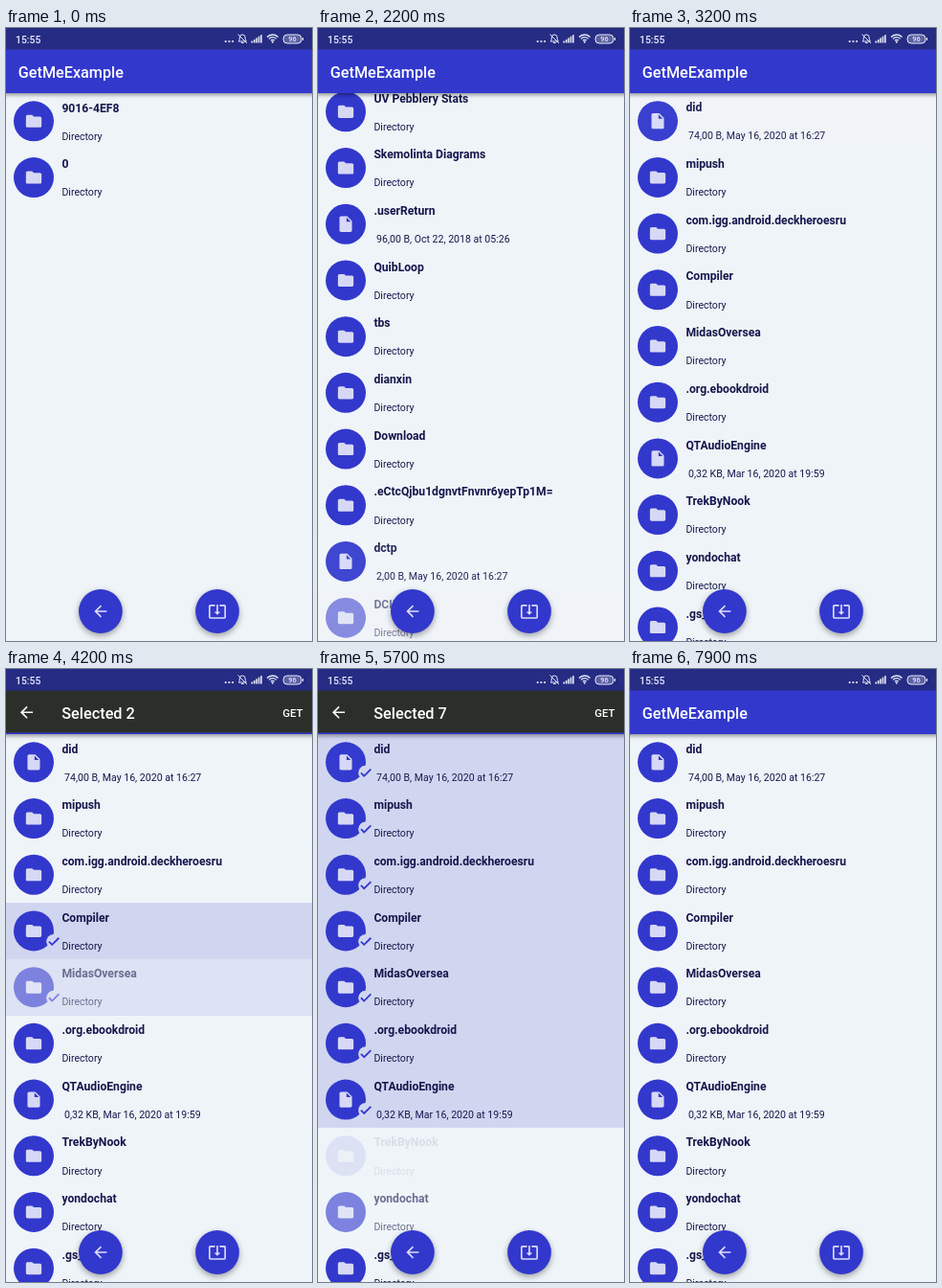
Write an HTML page with a canvas that moves like this. It is 320x640 px and loops after 8000 ms.

```html
<!DOCTYPE html>
<html lang="en">
<head>
<meta charset="utf-8">
<title>File picker</title>
<style>
  html, body { margin: 0; width: 100%; height: 100%; overflow: hidden; background: #eff4f9; }
  canvas { display: block; width: 320px; height: 640px; }
</style>
</head>
<body>
<canvas id="stage"></canvas>
<script>
const W = 320, H = 640, LOOP = 8000;
const TOP = 68, ROW = 58.7, DP = 0.815;
const FADE = 300, OPEN = 1250;
const BLUE = '#3238cc', NAVY = '#262c84', BG = '#eff4f9', PICKED = '#d0d5f0';
const INK = '#15174b', PALE = '#d6d8f6', DARK = '#2b2f2a';

const canvas = document.getElementById('stage');
const dpr = window.devicePixelRatio || 1;
canvas.width = W * dpr;
canvas.height = H * dpr;
const ctx = canvas.getContext('2d');

const icons = {
  folder: 'M10 4H4c-1.1 0-1.99.9-1.99 2L2 18c0 1.1.9 2 2 2h16c1.1 0 2-.9 2-2V8c0-1.1-.9-2-2-2h-8l-2-2z',
  file: 'M6 2c-1.1 0-1.99.9-1.99 2L4 20c0 1.1.89 2 1.99 2H18c1.1 0 2-.9 2-2V8l-6-6H6zm7 7V3.5L18.5 9H13z',
  back: 'M20 11H7.83l5.59-5.59L12 4l-8 8 8 8 1.41-1.41L7.83 13H20v-2z',
  save: 'M12 16.5l4-4h-3v-9h-2v9H8l4 4zm9-13h-6v1.99h6v14.03H3V5.49h6V3.5H3c-1.1 0-2 .9-2 2v14c0 1.1.9 2 2 2h18c1.1 0 2-.9 2-2v-14c0-1.1-.9-2-2-2z'
};
for (const k in icons) icons[k] = new Path2D(icons[k]);

// Entries with a part after "|" are files, the rest are directories.
const parse = s => {
  const [name, info] = s.split('|');
  return { name, info: info || 'Directory', icon: info ? 'file' : 'folder' };
};
const roots = ['9016-4EF8', '0'].map(parse);
const files = [
  'did| 74,00 B, May 16, 2020 at 16:27', 'mipush', 'com.igg.android.deckheroesru',
  'Compiler', 'MidasOversea', '.org.ebookdroid',
  'QTAudioEngine| 0,32 KB, Mar 16, 2020 at 19:59', 'TrekByNook', 'yondochat',
  '.gs_fs0', 'Android', 'Pictures', 'Movies', 'Alarms',
  'UV Pebblery Stats', 'Skemolinta Diagrams',
  '.userReturn| 96,00 B, Oct 22, 2018 at 05:26', 'QuibLoop', 'tbs', 'dianxin',
  'Download', '.eCtcQjbu1dgnvtFnvnr6yepTp1M=',
  'dctp| 2,00 B, May 16, 2020 at 16:27', 'DCIM', 'Music', 'Podcasts', 'Ringtones'
].map(parse);

// [time, row]: each tap toggles a row.
const taps = [
  [3800, 3], [4030, 4], [4260, 5], [4490, 6], [4720, 7], [4950, 8],
  [5200, 2], [5310, 1], [5420, 0], [5530, 8], [5640, 7], [5750, 6],
  [5860, 5], [5970, 4], [6220, 0], [6340, 1], [6560, 2], [6780, 3]
];

const clamp = v => Math.max(0, Math.min(1, v));
const fling = (t, a, b) => 1 - (1 - clamp((t - a) / (b - a))) ** 3;
const scrollAt = t =>
  844.8 * (fling(t, 1540, 2420) - fling(t, 2520, 3240)) +
  3.2 * (fling(t, 4550, 4750) - fling(t, 5120, 5300));

const inView = (i, t) => {
  const y = i * ROW - scrollAt(t);
  return y < H - TOP && y + ROW > 0;
};

// Opacity since the row was last opened, scrolled in or tapped.
function rowAlpha(i, t) {
  let age = Math.min(FADE, t - OPEN);
  for (const [at, row] of taps) if (row === i && at <= t) age = Math.min(age, t - at);
  for (let d = 0; d < age; d += 8) if (!inView(i, t - d)) age = d;
  return (1 - Math.cos(Math.PI * clamp(age / FADE))) / 2;
}

function text(s, x, y, size, weight, color, align = 'left') {
  ctx.font = `${weight} ${size}px Roboto, sans-serif`;
  ctx.textAlign = align;
  ctx.fillStyle = color;
  ctx.fillText(s, x, y);
}

function disc(x, y, r, color) {
  ctx.fillStyle = color;
  ctx.beginPath();
  ctx.arc(x, y, r, 0, Math.PI * 2);
  ctx.fill();
}

function icon(name, x, y, color) {
  ctx.save();
  ctx.translate(x - 12 * DP, y - 12 * DP);
  ctx.scale(DP, DP);
  ctx.fillStyle = color;
  ctx.fill(icons[name], 'evenodd');
  ctx.restore();
}

function badge(x, y) {
  disc(x, y, 7.6, PICKED);
  ctx.strokeStyle = BLUE;
  ctx.lineWidth = 1.8;
  ctx.beginPath();
  ctx.moveTo(x - 4.9, y);
  ctx.lineTo(x - 1.6, y + 3.3);
  ctx.lineTo(x + 5.5, y - 3.8);
  ctx.stroke();
}

function shadow(blur, dy, alpha) {
  ctx.shadowColor = `rgba(0,0,0,${alpha})`;
  ctx.shadowBlur = blur * dpr;
  ctx.shadowOffsetY = dy * dpr;
}

function drawRow(item, y, alpha, picked) {
  const cy = y + ROW / 2;
  if (picked) {
    ctx.fillStyle = PICKED;
    ctx.fillRect(0, y, W, ROW + 0.3);
  }
  disc(29, cy, 21, BLUE);
  icon(item.icon, 29, cy, PALE);
  text(item.name, 58.4, y + 19.5, 12.16, 700, INK);
  text(item.info, 58.4, y + 48.6, 10.57, 400, INK);
  if (picked) badge(49.8, cy + 11.1);
  if (alpha < 1) {
    ctx.globalAlpha = 1 - alpha;
    ctx.fillStyle = BG;
    ctx.fillRect(0, y, W, ROW);
    ctx.globalAlpha = 1;
  }
}

function drawList(t, picked) {
  if (t < OPEN) {
    ctx.fillStyle = `rgba(0,0,0,${0.04 * clamp((t - 1000) / 90)})`;
    ctx.fillRect(0, TOP + ROW, W, ROW);
    roots.forEach((item, i) => drawRow(item, TOP + i * ROW, 1, false));
    return;
  }
  const s = scrollAt(t);
  files.forEach((item, i) => {
    if (inView(i, t)) drawRow(item, TOP + i * ROW - s, rowAlpha(i, t), picked.has(i));
  });
}

function drawBar(count) {
  ctx.save();
  shadow(4, 1.5, 0.4);
  ctx.fillStyle = BLUE;
  ctx.fillRect(-10, 22, W + 20, TOP - 22);
  ctx.restore();
  if (count) {
    ctx.fillStyle = DARK;
    ctx.fillRect(0, 22, W, 44.5);
    icon('back', 21.5, 45.3, '#fff');
    text('Selected ' + count, 58.2, 51.8, 16.3, 500, '#fff');
    text('GET', 310.5, 49.8, 11.4, 500, '#fff', 'right');
  } else {
    text('GetMeExample', 12.8, 52, 16.2, 500, '#fff');
  }
}

function drawStatus() {
  const c = '#e8eaf8';
  ctx.fillStyle = NAVY;
  ctx.fillRect(0, 0, W, 22.5);
  text('15:55', 10, 15.6, 10.4, 500, c);
  for (let i = 0; i < 3; i++) disc(229.7 + i * 3.7, 14, 1.1, c);

  // Muted bell
  ctx.strokeStyle = c;
  ctx.lineWidth = 1;
  ctx.beginPath();
  ctx.moveTo(243.3, 14);
  ctx.quadraticCurveTo(244.5, 13, 244.3, 10);
  ctx.arc(247.2, 9.8, 2.9, Math.PI, 0);
  ctx.quadraticCurveTo(250, 13, 251.3, 14);
  ctx.closePath();
  ctx.moveTo(242.5, 6.5);
  ctx.lineTo(252, 16);
  ctx.stroke();
  ctx.fillStyle = c;
  ctx.fillRect(246, 15, 2.6, 1);

  for (let i = 0; i < 5; i++) {
    const h = 2 + i * 1.6;
    ctx.fillRect(256.5 + i * 2.4, 15.5 - h, 1.6, h);
  }

  ctx.lineWidth = 1.3;
  for (const r of [8, 5.3, 2.7]) {
    ctx.beginPath();
    ctx.arc(278.8, 15, r, -Math.PI * 0.76, -Math.PI * 0.24);
    ctx.stroke();
  }
  disc(278.8, 14.6, 1.1, c);

  // Battery
  ctx.lineWidth = 1;
  ctx.fillStyle = 'rgba(255,255,255,0.25)';
  ctx.beginPath();
  ctx.roundRect(290, 7, 19, 9, 4);
  ctx.fill();
  ctx.stroke();
  ctx.fillStyle = c;
  ctx.fillRect(310, 10, 1, 3);
  text('96', 299.5, 14.2, 7.4, 500, c, 'center');
}

function drawFab(x, name) {
  ctx.save();
  shadow(6, 2.5, 0.36);
  disc(x, 609, 22.9, BLUE);
  ctx.restore();
  icon(name, x, 609, '#dcdef8');
}

function draw(t) {
  const picked = new Set();
  for (const [at, row] of taps) {
    if (at <= t && !picked.delete(row)) picked.add(row);
  }
  ctx.setTransform(dpr, 0, 0, dpr, 0, 0);
  ctx.fillStyle = BG;
  ctx.fillRect(0, 0, W, H);
  drawList(t, picked);
  drawBar(picked.size);
  drawStatus();
  drawFab(98.9, 'back');
  drawFab(221, 'save');
}

function tick() {
  draw(performance.now() % LOOP);
  requestAnimationFrame(tick);
}
tick();
</script>
</body>
</html>
```
